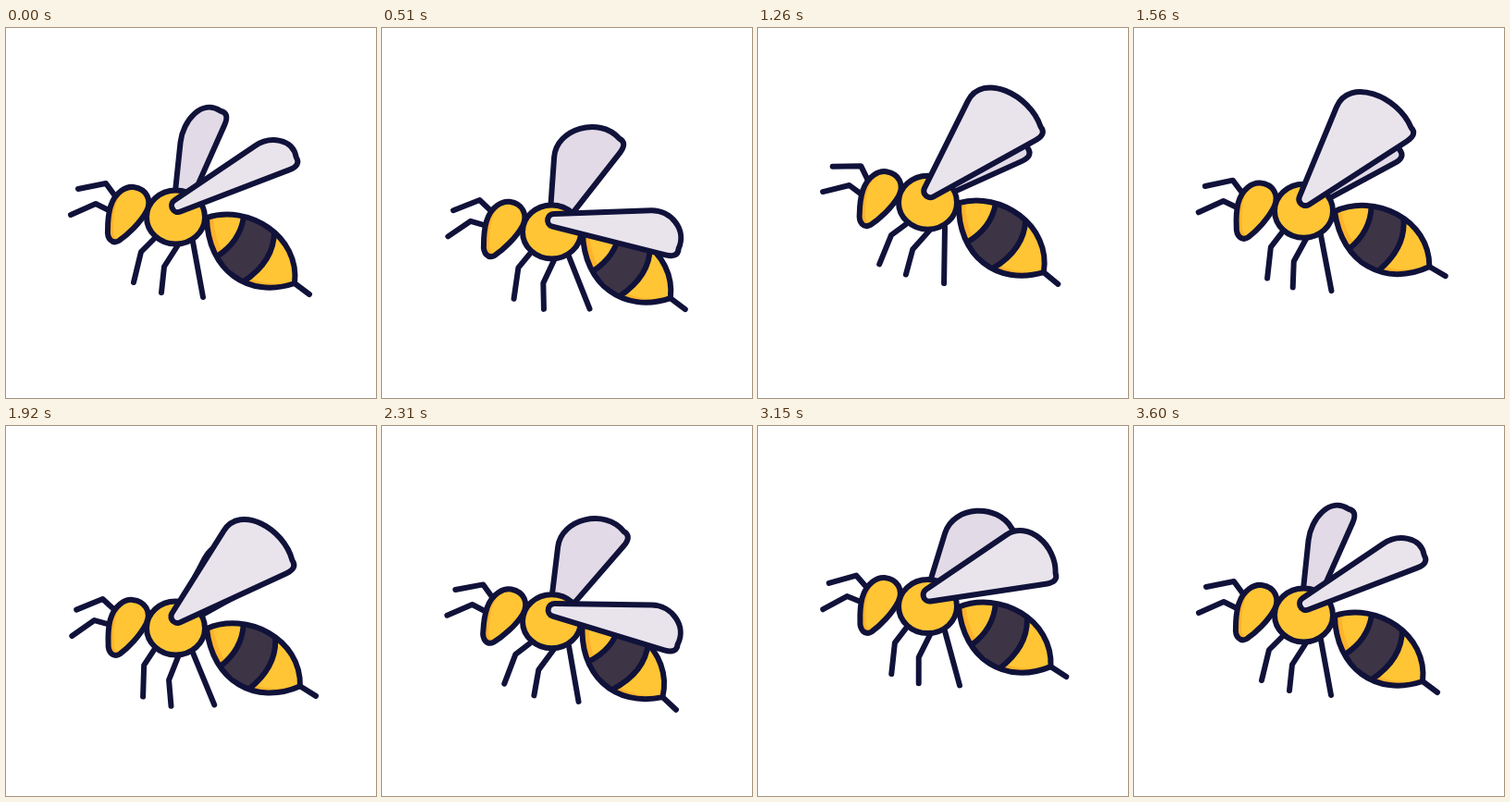
Recreate the animation shown at these times as an HTML page with a canvas. Size 400 px wide and 400 px high, loop 5630 ms.

```html
<!DOCTYPE html>
<html lang="en">
<head>
<meta charset="utf-8">
<title>Wasp</title>
<style>
  html, body { margin: 0; width: 100%; height: 100%; overflow: hidden; background: #fff; }
  canvas { display: block; width: 100vmin; height: 100vmin; }
</style>
</head>
<body>
<canvas id="stage" width="400" height="400"></canvas>
<script>
const ctx = document.getElementById('stage').getContext('2d');
const LOOP = 5630, STEP = 30, END = 120, HALF = 25, FLAP = 10;
const INK = '#10123a', YELLOW = '#ffc535', AMBER = '#ffb22b', DARK = '#3d3446';
const RAD = Math.PI / 180;

const head = new Path2D('M113 193C118 177 130 171 138 172C152 174 158 186 152 198C145 211 131 224 122 230C115 234 109 228 110 218C110 208 111 200 113 193Z');
const abdomen = new Path2D('M217 205C262 190 318 225 312 276C262 293 218 262 217 205Z');
const stripe = new Path2D('M257 204Q253 231 228 247L257 276Q290 252 290 220Z');
const bands = new Path2D('M257 204Q253 231 228 247M290 220Q290 252 257 274');

const legs = [
  { pts: [[160, 228], [146, 242], [138, 275]], first: 10, amp: 13.5 },
  { pts: [[187, 233], [171, 258], [168, 286]], first: 11.7, amp: 11.5 },
  { pts: [[202, 231], [213, 291]], first: 14.2, amp: 12 }
];
const feelers = [
  [[119, 183], [108, 168], [78, 174]],
  [[113, 198], [97, 190], [70, 202]]
];

// Edge angles of both wings in a flap: rest, raised, lowered.
const wings = {
  front: { base: [186, 192], len: [105, 126], fill: '#e9e4ec', rest: [-34, -21], up: [-68, -31], down: [-2, 14] },
  back: { base: [188, 196], len: [72, 103], fill: '#e2dae6', rest: [-84, -66], up: [-54, -21], down: [-86, -52] }
};

const mix = (a, b, k) => a + (b - a) * k;
const smooth = k => (1 - Math.cos(Math.PI * k)) / 2;

// Swings between +amp and -amp, easing from and to zero at the ends.
function swing(n, first, amp) {
  const edge = Math.min(1, first / 14);
  const last = first + 4 * HALF - (first > 17 ? HALF : 0);
  const peak = i => amp * (i % 2 ? -1 : 1) * (i === 0 || first + i * HALF > 100 ? edge : 1);
  if (n <= first) return peak(0) * smooth(n / first);
  if (n >= last) return peak(Math.round((last - first) / HALF)) * smooth((END - n) / (END - last));
  const i = Math.floor((n - first) / HALF);
  return mix(peak(i), peak(i + 1), smooth((n - first) / HALF - i));
}

function flap(w, n) {
  const p = n % FLAP;
  return [0, 1].map(i => {
    if (p < 2.8) return mix(w.rest[i], w.up[i], Math.sin(p / 2.8 * Math.PI / 2));
    if (p < 7) return mix(w.up[i], w.down[i], smooth((p - 2.8) / 4.2));
    return mix(w.down[i], w.rest[i], 1 - Math.cos((p - 7) / 3 * Math.PI / 2));
  });
}

function turned(x, y, deg, draw) {
  ctx.save();
  ctx.translate(x, y);
  ctx.rotate(deg * RAD);
  ctx.translate(-x, -y);
  draw();
  ctx.restore();
}

function line(pts, deg = 0) {
  turned(...pts[0], deg, () => {
    ctx.beginPath();
    pts.forEach(p => ctx.lineTo(...p));
    ctx.stroke();
  });
}

function shaded(path, dx, dy) {
  ctx.save();
  ctx.clip(path);
  ctx.fillStyle = AMBER;
  ctx.fill(path);
  ctx.translate(dx, dy);
  ctx.fillStyle = YELLOW;
  ctx.fill(path);
  ctx.restore();
}

function wing(w, n) {
  const [a, b] = flap(w, n).map(d => d * RAD);
  const [x, y] = w.base, r = 7;
  const at = (p, u, du, v = [0, 0], dv = 0) => [p[0] + u[0] * du + v[0] * dv, p[1] + u[1] * du + v[1] * dv];
  const e1 = [Math.cos(a), Math.sin(a)], n1 = [e1[1], -e1[0]];
  const e2 = [Math.cos(b), Math.sin(b)], n2 = [e2[1], -e2[0]];
  const top = at([x, y], e1, w.len[0], n1, r);
  const low = at([x, y], e2, w.len[1], n2, -r);
  const tip = at(low, e2, 12, n2, 10);
  const span = Math.hypot(tip[0] - top[0], tip[1] - top[1]);
  ctx.beginPath();
  ctx.arc(x, y, r, b + Math.PI / 2, a - Math.PI / 2);
  ctx.lineTo(...top);
  ctx.bezierCurveTo(...at(top, e1, span * 0.42), ...at(tip, n2, span * 0.44, e2, span * 0.08), ...tip);
  ctx.quadraticCurveTo(...at(low, e2, 14), ...low);
  ctx.closePath();
  ctx.fillStyle = w.fill;
  ctx.fill();
  ctx.stroke();
}

function draw(n) {
  const bob = swing(n, 18, 16);
  const tail = swing(n, 7, -8);
  const lean = tail * 0.45;
  const feel = swing(n, 14, -11);

  ctx.fillStyle = '#fff';
  ctx.fillRect(0, 0, 400, 400);
  ctx.save();
  ctx.translate(0, bob);
  ctx.strokeStyle = INK;
  ctx.lineWidth = 6;
  ctx.lineCap = ctx.lineJoin = 'round';

  for (const leg of legs) line(leg.pts, -swing(n, leg.first, leg.amp));
  turned(184, 205, lean, () => wing(wings.back, n));

  turned(217, 205, tail, () => {
    line([[312, 276], [328, 288]]);
    shaded(abdomen, 7, -4);
    ctx.save();
    ctx.clip(abdomen);
    ctx.fillStyle = DARK;
    ctx.fill(stripe);
    ctx.stroke(bands);
    ctx.restore();
    ctx.stroke(abdomen);
  });

  ctx.beginPath();
  ctx.ellipse(183.5, 204.5, 31.5, 29, 0, 0, Math.PI * 2);
  ctx.fillStyle = YELLOW;
  ctx.fill();
  ctx.stroke();

  turned(184, 205, lean, () => {
    for (const f of feelers) line(f, feel - lean);
    shaded(head, 6, -2);
    ctx.stroke(head);
    wing(wings.front, n);
  });
  ctx.restore();
}

function tick() {
  const t = performance.now() % LOOP;
  draw(Math.min(END, Math.floor(t / STEP)));
  requestAnimationFrame(tick);
}
tick();
</script>
</body>
</html>
```
